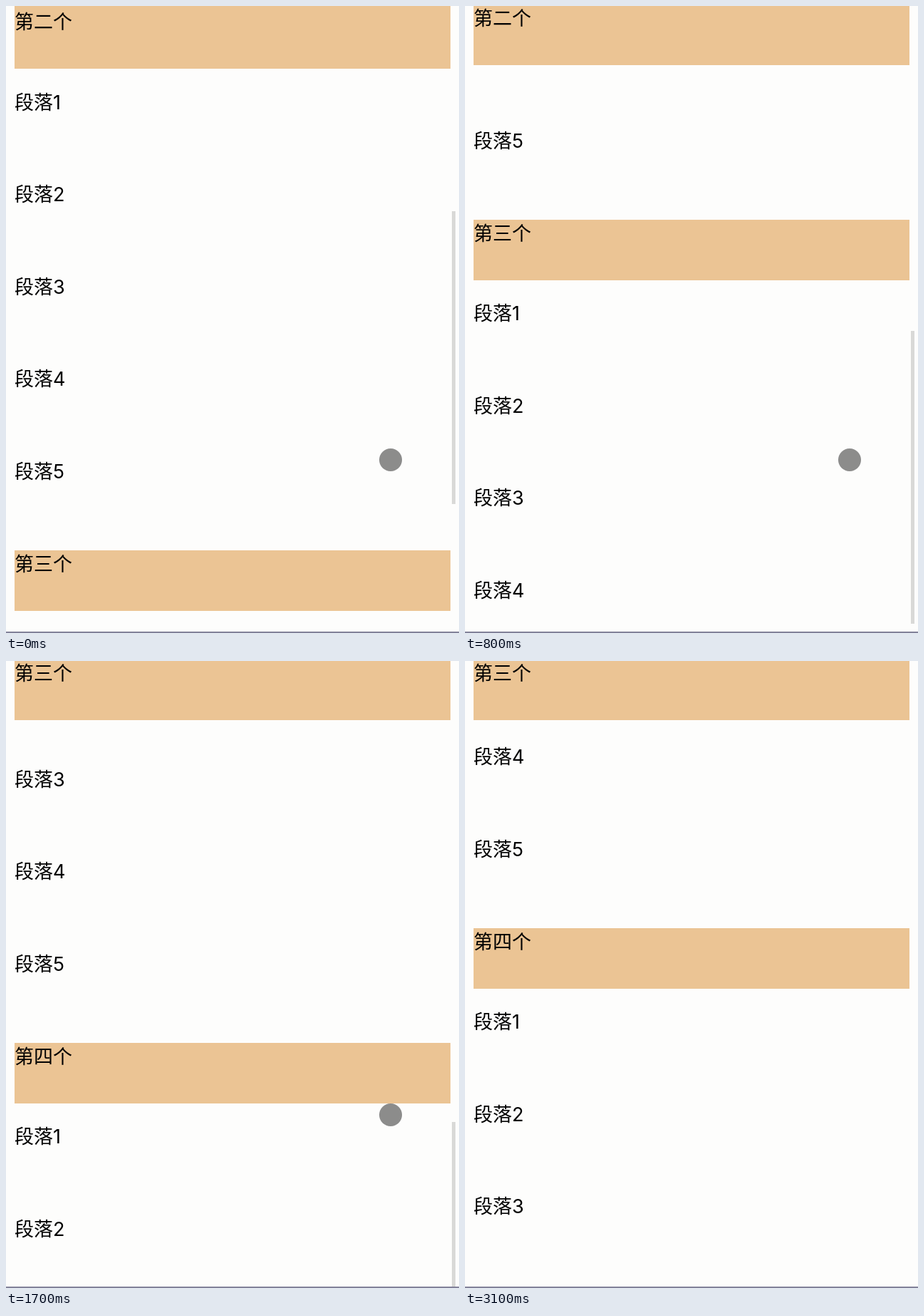
Recreate the animation shown at these times as an HTML page. Size 636 by 880 pixels, loop 3200 ms.

```html
<!DOCTYPE html>
<html lang="zh-CN">
<head>
<meta charset="utf-8">
<title>Sticky headings</title>
<style>
  html, body { margin: 0; width: 100%; height: 100%; overflow: hidden; background: #fdfdfc; }
  #stage { position: relative; width: 636px; height: 880px; overflow: hidden; }
  #stage > * { position: absolute; top: 0; }
  .heading, .para {
    left: 12px;
    width: 612px;
    font: 27px/40px Inter, "Noto Sans CJK SC", "Noto Sans CJK", sans-serif;
    color: #000;
    white-space: nowrap;
  }
  .heading { height: 85px; background: #ebc494; z-index: 1; }
  #thumb { left: 626px; width: 5px; height: 411px; background: #d9d9d7; z-index: 2; }
  #pointer { left: 523.5px; margin-top: 621px; width: 32px; height: 32px; border-radius: 50%; background: #8c8c8b; z-index: 3; }
  #edge { left: 0; margin-top: 878px; width: 636px; height: 2px; background: #82829a; z-index: 4; }
</style>
</head>
<body>
<div id="stage">
  <div id="thumb"></div>
  <div id="pointer"></div>
  <div id="edge"></div>
</div>
<script>
const LOOP = 3200, STEP = 100;
const SECTION = 760.5, PARA_TOP = 112.5, PARA_GAP = 129.6;
const STICKY_TOP = -1.5, MAX_SCROLL = 1146;

// [time in ms, scroll offset]: three flicks, then a rubber-band return
const SCROLL = [
  [0, -3.5], [100, 70], [200, 172], [300, 253], [400, 313.5], [500, 358],
  [600, 396], [800, 460.5], [900, 530], [1000, 615], [1100, 685.5],
  [1200, 730], [1300, 762], [1500, 808], [1600, 880], [1700, 985],
  [1800, 1085], [1900, 1158], [2000, 1170], [2100, 1169], [2200, 1163],
  [2300, 1158], [2400, 1154], [2600, 1150], [2800, 1148], [3100, 1146]
];

const stage = document.getElementById("stage");
const thumb = document.getElementById("thumb");
const pointer = document.getElementById("pointer");
const items = [];

function addItem(kind, text, top) {
  const el = document.createElement("div");
  el.className = kind;
  el.textContent = text;
  stage.append(el);
  items.push({ el, top, sticky: kind === "heading" });
}

[..."一二三四"].forEach((numeral, i) => {
  const top = (i - 1) * SECTION;
  addItem("heading", `第${numeral}个`, top);
  for (let n = 0; n < 5; n++) addItem("para", `段落${n + 1}`, top + PARA_TOP + n * PARA_GAP);
});

function scrollAt(t) {
  const next = SCROLL.findIndex(([time]) => time > t);
  if (next < 0) return MAX_SCROLL;
  const [t0, a] = SCROLL[next - 1], [t1, b] = SCROLL[next];
  return a + (b - a) * (t - t0) / (t1 - t0);
}

const moveTo = (el, y) => { el.style.transform = `translateY(${Math.floor(y)}px)`; };

function render(t) {
  const scroll = scrollAt(t);
  const overscroll = Math.max(0, scroll - MAX_SCROLL);
  for (const { el, top, sticky } of items) {
    const y = top - scroll;
    moveTo(el, sticky ? Math.max(y, STICKY_TOP - overscroll) : y);
  }
  moveTo(thumb, 289.8 + 0.363 * (scroll - overscroll));
  thumb.style.opacity = Math.min(1, Math.max(0, (2900 - t) / 400));
  pointer.style.visibility = t < 3100 ? "visible" : "hidden";
}

const start = performance.now();
function tick() {
  const t = (performance.now() - start) % LOOP;
  render(Math.floor(t / STEP) * STEP);
  requestAnimationFrame(tick);
}
tick();
</script>
</body>
</html>
```
